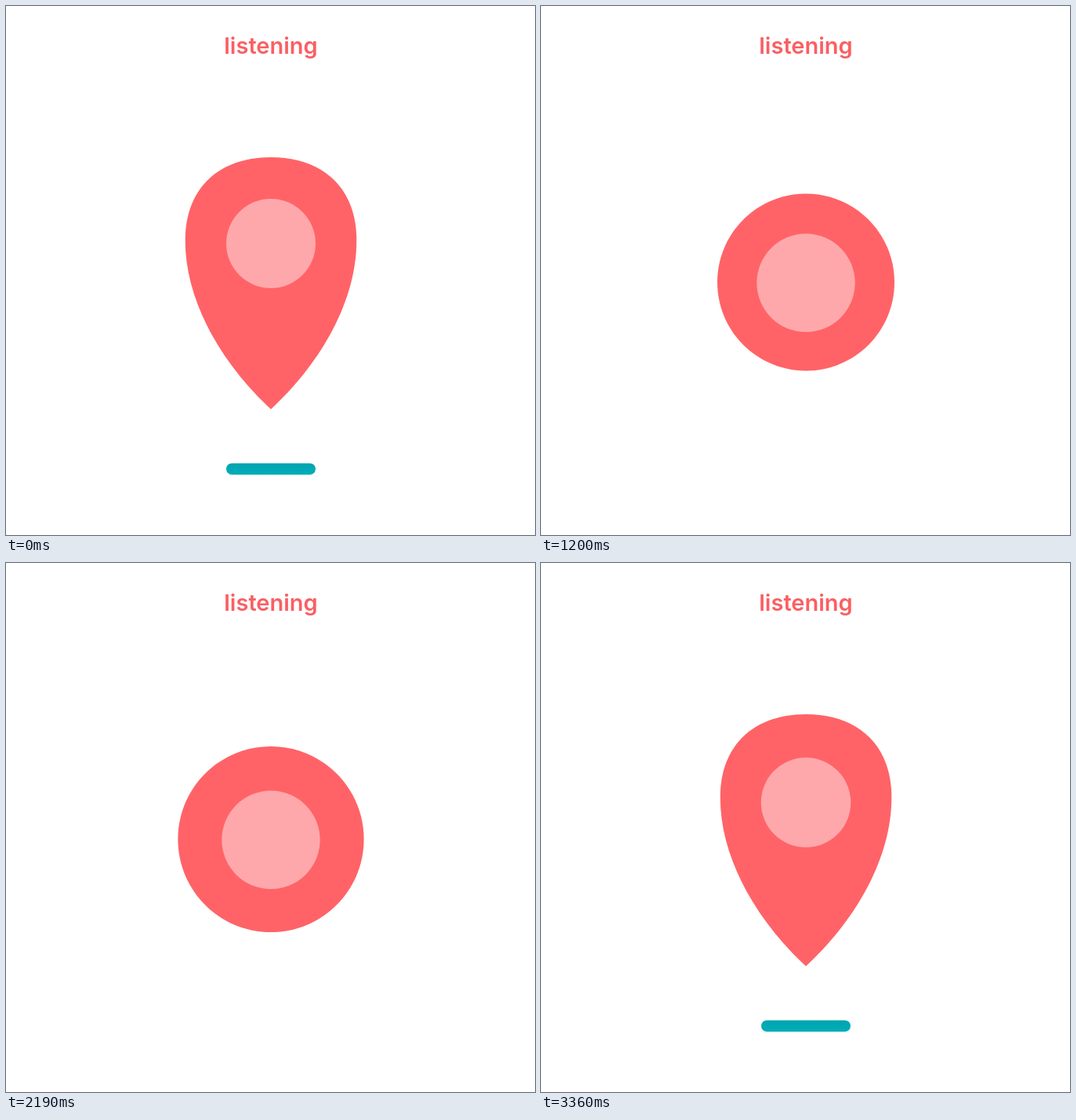
Recreate the animation shown at these times as an HTML page. Size 675 by 675 pixels, loop 3.39 s.

```html
<!DOCTYPE html>
<html lang="en">
<head>
<meta charset="utf-8">
<title>Listening</title>
<style>
  html, body { margin: 0; width: 100%; height: 100%; overflow: hidden; background: #fff; }
  svg { display: block; width: 100vw; height: 100vh; }
  text { font: 600 29px Inter, "Open Sans", sans-serif; fill: #fa5f63; text-anchor: middle; }
</style>
</head>
<body>
<svg viewBox="0 0 675 675">
  <defs>
    <linearGradient id="teal" x1="0" y1="0" x2="0" y2="1">
      <stop offset="0" stop-color="#00a4b0"/>
      <stop offset="1" stop-color="#00aeb8"/>
    </linearGradient>
  </defs>
  <text x="338" y="60.5">listening</text>
  <rect id="bar" y="583.5" height="14.5" rx="7.25" fill="url(#teal)"/>
  <path id="body" fill="#ff6367"/>
  <circle id="dot" cx="338" fill="#ffa8ab"/>
</svg>
<script>
  const LOOP = 3390, STEP = 30, MORPH = 420;
  const IN_START = 270, PULSE_START = 750, OUT_START = LOOP - MORPH;
  const CX = 338, CY = 352.5, FULL = 127, PERIOD = 420;

  // Right half outline as [dx, y]: top, handles, side, handles, tip.
  const PIN = [[0, 193], [64, 193], [109.3, 230], [109.3, 299],
               [109.3, 378], [62, 457], [0, 514.5]];

  const [bar, body, dot] = ['bar', 'body', 'dot'].map(id => document.getElementById(id));
  const clamp = v => Math.min(1, Math.max(0, v));
  const lerp = (a, b, k) => a + (b - a) * k;
  const smooth = v => (1 - Math.cos(Math.PI * clamp(v))) / 2;

  function set(el, attrs) {
    for (const name in attrs) el.setAttribute(name, attrs[name]);
  }

  function circleOutline(r) {
    const k = r * 0.5523;
    return [[0, CY - r], [k, CY - r], [r, CY - k], [r, CY],
            [r, CY + k], [k, CY + r], [0, CY + r]];
  }

  function toPath(points) {
    const at = (i, side) => `${CX + side * points[i][0]} ${points[i][1]}`;
    return `M${at(0, 1)}C${[1, 2, 3].map(i => at(i, 1))}C${[4, 5, 6].map(i => at(i, 1))}` +
           `C${[5, 4, 3].map(i => at(i, -1))}C${[2, 1, 0].map(i => at(i, -1))}Z`;
  }

  // Amount of circle: 0 is the pin, 1 is the full circle.
  function morphAt(t) {
    return t < OUT_START ? clamp((t - IN_START) / MORPH) : clamp((LOOP - t) / MORPH);
  }

  function radiusAt(t) {
    if (t <= PULSE_START || t >= OUT_START) return FULL;
    const swell = (1 + Math.cos(2 * Math.PI * (t - OUT_START) / PERIOD)) / 2;
    const peak = t > 1500 ? 7 * swell ** 6 : 0;
    return lerp(FULL, 102 + 18 * swell + peak, clamp((t - PULSE_START) / 60));
  }

  function draw(t) {
    const m = morphAt(t);
    const shape = smooth((m * 14 - 1) / 13);
    const inner = lerp(m, smooth(m), 0.35);
    const outline = circleOutline(radiusAt(t));
    set(body, { d: toPath(PIN.map(([x, y], i) =>
      [lerp(x, outline[i][0], shape), lerp(y, outline[i][1], shape)])) });
    set(dot, { cy: lerp(303, 353.3, inner), r: lerp(57, 62.7, inner) });
    const width = 114 * (1 - smooth((m - 1 / 14) / 0.5));
    set(bar, { x: CX - width / 2, width });
  }

  const start = performance.now();
  function tick() {
    const t = (performance.now() - start) % LOOP;
    draw(Math.floor(t / STEP) * STEP);
    requestAnimationFrame(tick);
  }
  tick();
</script>
</body>
</html>
```
